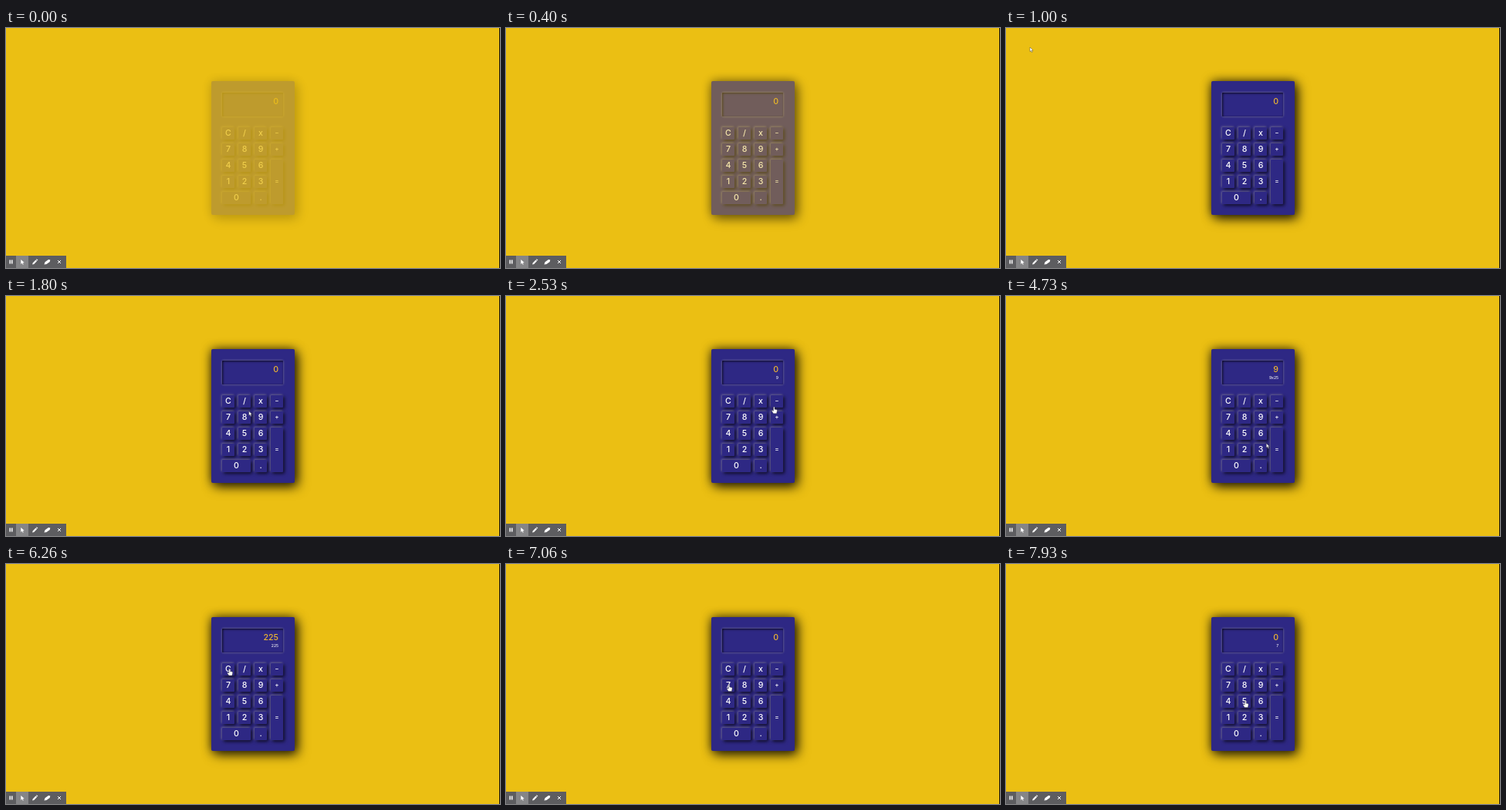
Animation of 640 by 312 pixels, one loop 8000 ms. Source, as an HTML page:

```html
<!DOCTYPE html>
<html lang="en">
<head>
<meta charset="utf-8">
<title>Calculator</title>
<style>
html, body { margin: 0; width: 100%; height: 100%; overflow: hidden; background: #ebbf13; }
#stage { position: relative; width: 640px; height: 312px; overflow: hidden; background: #ebbf13; font-family: Inter, Roboto, sans-serif; font-weight: 500; }
#stage::after { content: ""; position: absolute; right: 0; top: 0; width: 1px; height: 100%; background: #15110a; }
#calc { position: absolute; left: 266px; top: 69px; width: 108px; height: 174px; border-radius: 2px; background: #2e2884;
  box-shadow: 4px 5px 15px rgba(0,0,0,.72), 0 0 13px rgba(0,0,0,.62); }
#screen { position: absolute; left: 14px; top: 15px; width: 79px; height: 31px; border-radius: 1px;
  box-shadow: 0 0 3px rgba(200,195,165,.55), inset 1px 1px 3px rgba(0,0,0,.75); }
#screen div { position: absolute; right: 6px; line-height: 12px; white-space: pre; }
#main { top: 6px; font-size: 10.6px; color: #ecb431; }
#sub { top: 16px; font-size: 5px; color: #f1f0f5; }
.key { position: absolute; border-radius: 1px; display: flex; align-items: center; justify-content: center; background: #2e2884; color: #fff; font-size: 10.6px; line-height: 15px; padding-bottom: 1px; box-sizing: border-box;
  box-shadow: 2px 2px 4px rgba(0,0,0,.7), -1px -1px 3px rgba(205,200,185,.42); }
.key.op { font-size: 8px; }
svg { position: absolute; overflow: visible; }
#bar { left: 0; top: 296px; }
#cursor { left: 0; top: 0; }
</style>
</head>
<body>
<div id="stage">
  <div id="calc">
    <div id="screen"><div id="main">0</div><div id="sub"></div></div>
  </div>
  <svg id="bar" width="78" height="16">
    <path fill="#5d5d60" d="M0 0h78v16H0z"/>
    <path fill="#858587" d="M13 0h16v16H13z"/>
    <g fill="#fff">
      <path d="M4.5 5.5h1.5v5H4.5zM7 5.5h1.5v5H7z"/>
      <path d="M19.3 5l4.4 4.1-2 .1 1 2-.9.5-1-2.1-1.5 1.3z"/>
      <path d="M34.2 11.5l.4-2 3.9-4 1.6 1.6-3.9 4zM39 5l.8-.8 1.6 1.6-.8.8z"/>
      <path d="M49.5 11.5l1-3.2 4.5-3.2 2.3.3-.6 2.5-4.2 3.1z"/>
    </g>
    <path d="M67 6l4 4m0-4l-4 4" stroke="#fff" fill="none"/>
  </svg>
  <svg id="cursor" width="1" height="1" fill="#fff" stroke="#333" stroke-width=".4">
    <path id="arrow" d="M0 0v5.6l1.3-1.2 1 2.2 1-.5-1-2.1h1.8z"/>
    <path id="hand" d="M-.8.2Q0-.7.8.2V3l2.5.5Q4.2 3.8 4.1 5L3.3 8.5H-.8L-2.8 5.4Q-2.8 4.2-1.8 4.5L-.8 5.3z"/>
  </svg>
</div>
<script>
const LOOP = 8000, PITCH = 21, SIZE = 16, FADE = 750;
const APPEAR = 990, DWELL = 150, GLIDE = 700;
const $ = id => document.getElementById(id);
const calc = $("calc"), keys = {};

function addKey(label, col, row, cols = 1, rows = 1) {
  const k = { x: 14 + col * PITCH, y: 60 + row * PITCH,
    w: SIZE + (cols - 1) * PITCH, h: SIZE + (rows - 1) * PITCH };
  const el = document.createElement("div");
  el.className = "−+=".includes(label) ? "key op" : "key";
  el.textContent = label;
  el.style.cssText = `left:${k.x}px;top:${k.y}px;width:${k.w}px;height:${k.h}px`;
  calc.append(el);
  keys[label] = k;
}

["C/x−", "789+", "456", "123"].forEach((line, row) =>
  [...line].forEach((label, col) => addKey(label, col, row)));
addKey("0", 0, 4, 2);
addKey(".", 2, 4);
addKey("=", 3, 2, 1, 3);

// bow is the sideways swing of the pointer on its way to the key
const presses = [
  { label: "9", at: 2050 }, { label: "x", at: 2930, bow: 17 },
  { label: "2", at: 3660 }, { label: "5", at: 4100 }, { label: "=", at: 5160 },
  { label: "C", at: 6450 }, { label: "7", at: 7200 }, { label: "5", at: 8060 }
];

function keyPoint(label) {
  const k = keys[label];
  return [266 + k.x + k.w / 2 + 1, 69 + k.y + k.h / 2 - 1];
}

function pointerAt(t) {
  let [x, y] = [31, 25], free = APPEAR;
  for (const { label, at, bow = 0 } of presses) {
    const [tx, ty] = keyPoint(label), end = at - DWELL;
    const begin = Math.max(free, end - GLIDE);
    if (t < begin) break;
    const u = Math.min(1, (t - begin) / (end - begin)), e = u * u * (3 - 2 * u);
    x += (tx - x) * e + bow * 4 * e * (1 - e);
    y += (ty - y) * e;
    if (u < 1) break;
    free = at + DWELL;
  }
  return [x, y];
}

function readoutAt(t) {
  let result = "0", expr = "";
  for (const { label, at } of presses) {
    if (at > t) break;
    const product = expr.split("x").reduce((a, b) => a * b, 1);
    if (label === "C") [result, expr] = ["0", ""];
    else if (label === "=") result = expr = String(product);
    else {
      if (label === "x") result = String(product);
      expr += label;
    }
  }
  return [result, expr];
}

function overKey(x, y) {
  const dx = x - 266, dy = y - 69;
  return Object.values(keys).some(k =>
    dx >= k.x - 1 && dx <= k.x + k.w + 1 && dy >= k.y && dy <= k.y + k.h);
}

function draw(t) {
  calc.style.opacity = Math.min(1, 0.23 + 0.77 * t / FADE);
  [$("main").textContent, $("sub").textContent] = readoutAt(t);
  const [x, y] = pointerAt(t), hot = overKey(x, y);
  $("cursor").style.display = t >= APPEAR ? "" : "none";
  $("cursor").style.transform = `translate(${x}px,${y}px)`;
  $("hand").style.display = hot ? "" : "none";
  $("arrow").style.display = hot ? "none" : "";
}

const start = performance.now();
function tick() {
  draw((performance.now() - start) % LOOP);
  requestAnimationFrame(tick);
}
tick();
</script>
</body>
</html>
```
